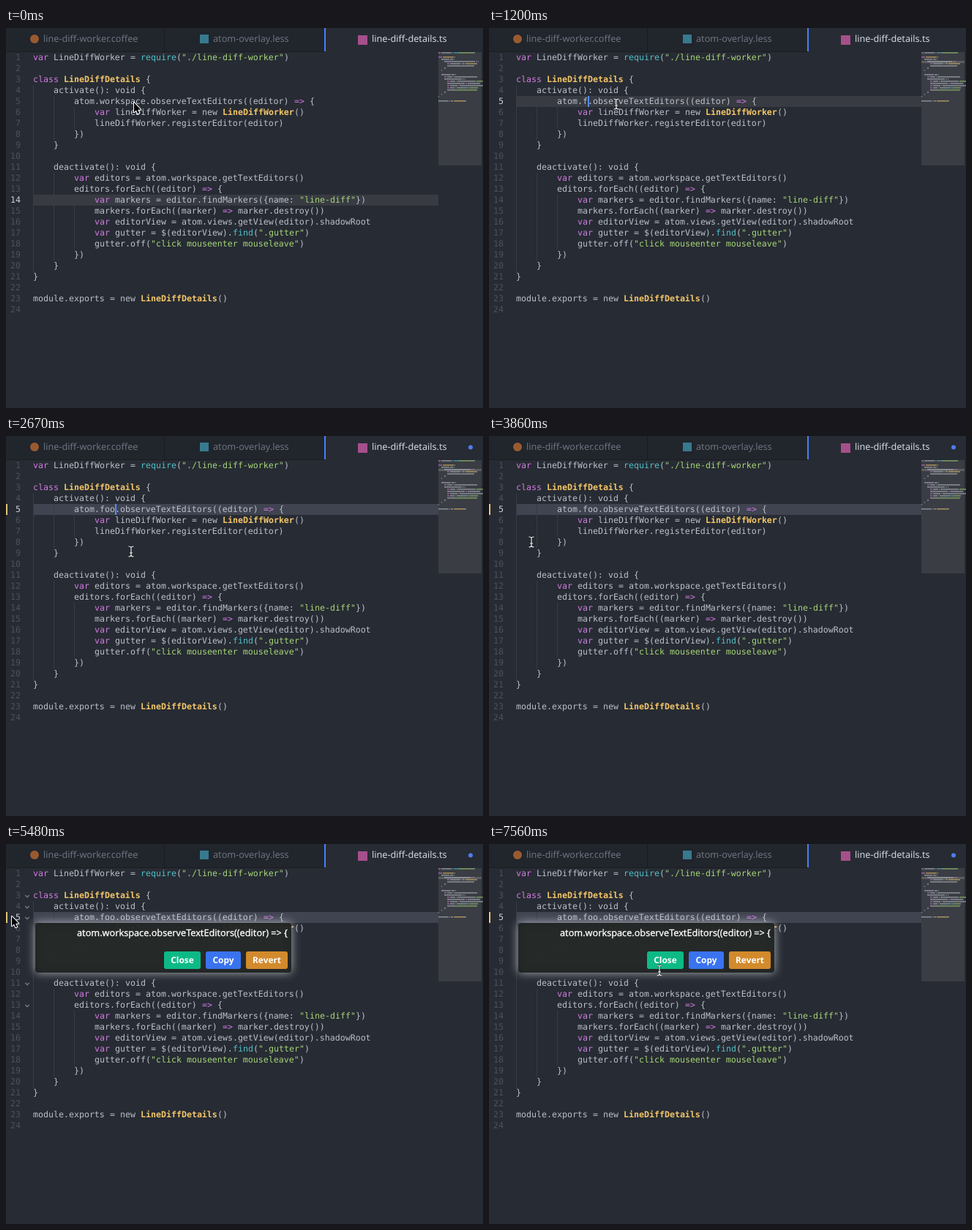
Write an HTML page with a canvas that moves like this. It is 652 px wide and 520 px high and loops after 8 s.

```html
<!DOCTYPE html>
<html lang="en">
<head>
<meta charset="utf-8">
<title>Line diff in an editor</title>
<style>
html, body { margin: 0; width: 100%; height: 100%; overflow: hidden; background: #272b33; }
canvas { display: block; }
</style>
</head>
<body>
<canvas id="stage" width="652" height="520"></canvas>
<script>
const ctx = document.getElementById('stage').getContext('2d');
const LOOP = 8000, STEPS = 54;
const CHAR = 7, ROW = 15, LEFT = 37, TOP = 33;
const MONO = '11.627px "DejaVu Sans Mono", monospace';
const SANS = '12.66px "Noto Sans", "Open Sans", sans-serif';
const BOLD = 'bold 11.9px "Noto Sans", "Open Sans", sans-serif';
const C = {
  bg: '#272b33', bar: '#21252c', edge: '#191c21', text: '#bbc1cc', dim: '#4b5260',
  purple: '#d07be3', green: '#a6d678', yellow: '#f3c668', cyan: '#4fc0c9', caret: '#528bff'
};

const SOURCE = `var LineDiffWorker = require("./line-diff-worker")

class LineDiffDetails {
    activate(): void {
        atom.workspace.observeTextEditors((editor) => {
            var lineDiffWorker = new LineDiffWorker()
            lineDiffWorker.registerEditor(editor)
        })
    }

    deactivate(): void {
        var editors = atom.workspace.getTextEditors()
        editors.forEach((editor) => {
            var markers = editor.findMarkers({name: "line-diff"})
            markers.forEach((marker) => marker.destroy())
            var editorView = atom.views.getView(editor).shadowRoot
            var gutter = $(editorView).find(".gutter")
            gutter.off("click mouseenter mouseleave")
        })
    }
}

module.exports = new LineDiffDetails()
`.split('\n');

const TOKEN = /(".*?")|(=>|\b(?:var|class)\b)|((?<=new |class )\w+)|(\b(?:require|find)(?=\())|[^\s"]+?(?=\s|"|=>|\b(?:require|find)\(|$)/g;
const tokens = line => [...line.matchAll(TOKEN)].map(m => ({
  s: m[0], at: m.index, bold: !!m[3],
  color: m[1] ? C.green : m[2] ? C.purple : m[3] ? C.yellow : m[4] ? C.cyan : C.text
}));

const rowY = n => TOP + (n - 1) * ROW;

function rect(x, y, w, h, color) {
  ctx.fillStyle = color;
  ctx.fillRect(x, y, w, h);
}
function round(x, y, w, h, r, color) {
  ctx.fillStyle = color;
  ctx.beginPath();
  ctx.roundRect(x, y, w, h, r);
  ctx.fill();
}
function text(s, x, y, font, color, align = 'left') {
  ctx.font = font;
  ctx.fillStyle = color;
  ctx.textAlign = align;
  ctx.fillText(s, x, y);
}
function dot(x, y, r, color) {
  ctx.fillStyle = color;
  ctx.beginPath();
  ctx.arc(x, y, r, 0, 7);
  ctx.fill();
}

function tabs(modified) {
  rect(0, 0, 436, 33, C.bar);
  rect(0, 32, 436, 1, C.edge);
  rect(216, 0, 1, 33, C.edge);
  rect(435, 0, 2, 32, '#4a80f5');
  dot(39, 15, 6, '#9a5a30');
  text('line-diff-worker.coffee', 51, 19, SANS, '#6d7480');
  rect(265, 9, 12, 12, '#37798f');
  text('atom-overlay.less', 283, 19, SANS, '#6d7480');
  rect(481, 10, 13, 13, '#a5508a');
  text('line-diff-details.ts', 500, 19, SANS, '#d5d9e0');
  if (modified) dot(635, 15.5, 3, '#4d7df0');
}

function guides(lines) {
  let depth = 0;
  lines.forEach((line, i) => {
    if (line) depth = line.search(/\S/) / 4;
    const n = line || i === 9 ? depth : 0;
    for (let d = 0; d < n; d++) rect(LEFT + d * 28, rowY(i + 1), 1, ROW, '#373c45');
  });
}

function code(lines, active) {
  lines.forEach((line, i) => {
    const y = rowY(i + 1) + 11;
    text(i + 1, 20, y, MONO, i + 1 === active ? '#cdd1d8' : C.dim, 'right');
    for (const t of tokens(line))
      text(t.s, LEFT + t.at * CHAR, y, (t.bold ? 'bold ' : '') + MONO, t.color);
  });
}

function minimap(lines, marked) {
  rect(591, 33, 59, 155, '#3a3d43');
  if (marked) rect(591, 45, 59, 3, '#5c5d5d');
  ctx.globalAlpha = .55;
  lines.forEach((line, i) => {
    for (const t of tokens(line))
      rect(591 + t.at, 33 + i * 3, t.s.length, 1.7, t.color);
  });
  ctx.globalAlpha = 1;
}

function folds() {
  ctx.strokeStyle = '#737a87';
  ctx.lineWidth = 1.4;
  for (const n of [3, 4, 5, 11, 13]) {
    const y = rowY(n) + 7;
    ctx.beginPath();
    ctx.moveTo(26.3, y);
    ctx.lineTo(29, y + 2.7);
    ctx.lineTo(31.7, y);
    ctx.stroke();
  }
}

function popup() {
  ctx.save();
  ctx.shadowColor = 'rgba(225,230,235,.75)';
  ctx.shadowBlur = 13;
  round(40, 108, 350, 68, 4, 'rgba(30,34,33,.95)');
  ctx.restore();
  const label = 'atom.workspace.observeTextEditors((editor) => {';
  text(label, 97, 126, SANS, '#fff');
  ctx.strokeStyle = '#fff';
  ctx.lineWidth = .3;
  ctx.strokeText(label, 97, 126);
  [['Close', 216, 50, '#0dba86'], ['Copy', 273, 48, '#3a73ef'], ['Revert', 328, 57, '#d28a2c']]
    .forEach(([s, x, w, color]) => {
      round(x, 147, w, 24, 3, color);
      text(s, x + w / 2, 163, BOLD, '#fff', 'center');
    });
}

function outlined(path, fill, line, width) {
  ctx.strokeStyle = line;
  ctx.lineWidth = width;
  ctx.stroke(path);
  if (fill) ctx.fill(path);
}
const ARROW = new Path2D('M0 0V13.2L3 10.5 5 15.2 7.2 14.3 5.2 9.7H9.3Z');
const BEAM = new Path2D('M-3.5 -7Q0 -7 0 -5V5Q0 7 -3.5 7M3.5 -7Q0 -7 0 -5M0 5Q0 7 3.5 7M-2 2H2');
function mouse(x, y, beam) {
  ctx.save();
  ctx.translate(x, y);
  ctx.lineJoin = 'round';
  if (beam) {
    outlined(BEAM, false, 'rgba(20,22,26,.7)', 2.6);
    outlined(BEAM, false, '#f2f2f2', 1.2);
  } else {
    ctx.fillStyle = '#000';
    outlined(ARROW, true, '#fff', 2);
  }
  ctx.restore();
}

// [step, x, y]
const PATH = [[0, 175, 102], [1, 174, 104], [14, 174, 104], [16, 174, 122], [18, 171, 158],
  [19, 170, 165], [23, 170, 165], [24, 148, 161], [26, 58, 145], [27, 25, 122], [28, 10, 106],
  [30, 3, 100], [34, 3, 100], [36, 8, 99], [46, 8, 99], [47, 42, 116], [49, 210, 168],
  [50, 250, 177], [51, 233, 173], [54, 233, 173]];
function mouseAt(k) {
  const i = PATH.findIndex(p => p[0] > k);
  const [a, ax, ay] = PATH[i - 1], [b, bx, by] = PATH[i];
  const f = (k - a) / (b - a);
  return [ax + (bx - ax) * f, ay + (by - ay) * f];
}

const TOGGLES = [8, 13, 16, 19, 21, 24, 27, 30, 32, 35];
const caretOn = k => TOGGLES.filter(s => s <= k).length % 2 === 1;

function draw(k) {
  const selected = k >= 2 && k < 8, typed = k >= 8;
  const word = typed ? 'foo'.slice(0, k - 7) : 'workspace';
  const lines = SOURCE.map((s, i) => i === 4 ? s.replace('workspace', word) : s);
  const active = k < 1 ? 14 : 5;
  const hover = k >= 27 && k < 47;

  rect(0, 0, 652, 520, C.bg);
  tabs(k >= 12);
  if (!selected) rect(LEFT, rowY(active), 554, ROW, k < 12 ? '#383b42' : '#404451');
  guides(lines);
  if (selected) {
    rect(128, rowY(5), 63, ROW, '#474e5d');
    ctx.strokeStyle = '#8a8f98';
    ctx.lineWidth = 1;
    ctx.beginPath();
    ctx.roundRect(226.5, rowY(12) + .5, 62, ROW - 1, 3);
    ctx.stroke();
  }
  code(lines, active);
  minimap(lines, typed);
  if (k >= 13) rect(0, rowY(5), 2, ROW, '#e0c27c');
  if (caretOn(k)) rect(128 + word.length * CHAR, rowY(5), 2, ROW, C.caret);
  if (hover) folds();
  if (k >= 37) popup();
  mouse(...mouseAt(k), k >= 1 && !hover);
}

ctx.textRendering = 'geometricPrecision';
function tick(now) {
  draw(Math.floor(now % LOOP / LOOP * STEPS + .05) % STEPS);
  requestAnimationFrame(tick);
}
requestAnimationFrame(tick);
</script>
</body>
</html>
```
